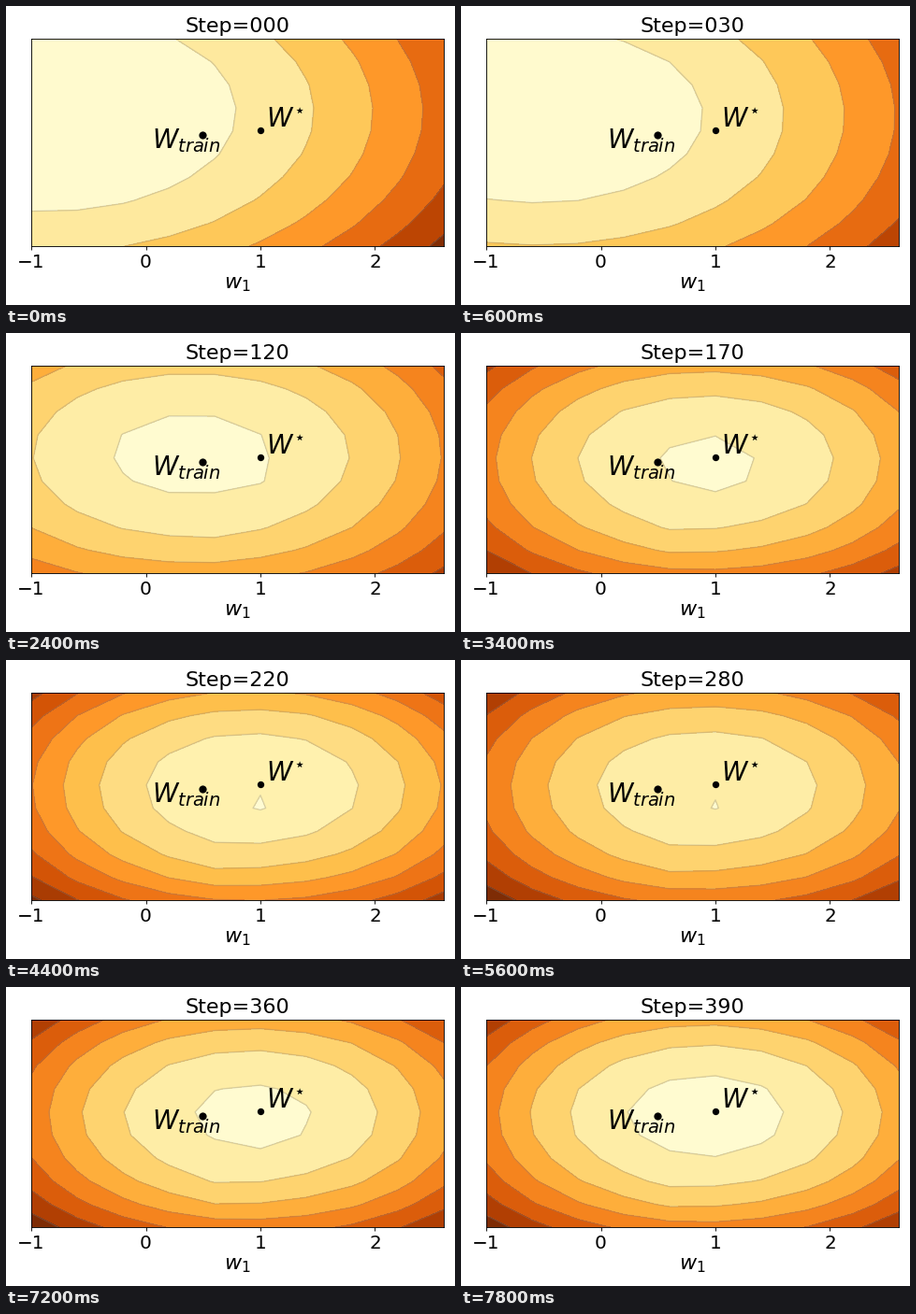
Write a matplotlib script that moves like this. It is 480 px wide and 320 px high and loops after 8000 ms.

```python
import numpy as np
import matplotlib.pyplot as plt
from matplotlib.animation import FuncAnimation

W, H, DPI = 480, 320, 80
LEFT, RIGHT, TOP, BOTTOM = 27.1, 467.9, 34.9, 257.4
FRAMES, INTERVAL, N = 40, 200, 10
ARRIVE = 17  # frame at which the bowl has reached its place

w1 = np.linspace(-1, 2.6, N)
rows = np.arange(N)
# grid cells right of w1 = 1 and below the W* row
U, V = np.meshgrid(np.arange(N) - 5, 5 - rows)


def dip(u, v, depth, spread):
    return depth * np.exp(-((U - u) ** 2 + (V - v) ** 2) / spread)


ROUGH = dip(0, 1, 0.2, 0.3) + dip(-1, 3.5, 0.25, 0.9)


def row_at(y):
    """Grid row for a height in pixels from the top of the stage."""
    return (BOTTOM - y) / (BOTTOM - TOP) * (N - 1)


def loss(frame):
    """Loss on the grid in units of one contour level, and the level count."""
    p = min(frame / ARRIVE, 1)
    late = max(0, frame - ARRIVE) / (FRAMES - 1 - ARRIVE)
    du = (U - (-4.67 + 4.48 * p)) ** 2
    dv = (V - (-0.82 + 0.95 * p)) ** 2
    steep = 0.063 + 0.081 * p ** 1.75 + 0.02 * late
    floor = np.interp(frame, [0, 7, 17, 28, 32, 39],
                      [-0.04, 0.5, 0.82, 1.05, 1.0, 0.48])
    bands = round(np.interp(frame, [0, 7, 17, 22, 27], [7, 8, 8, 9, 8]))
    z = floor + (steep + 0.005) * du + steep * dv
    z -= p * 0.0012 * du * dv + p ** 2 * ROUGH
    return np.clip(z * bands / 8, 0.001, bands - 0.001), bands


fig = plt.figure(figsize=(W / DPI, H / DPI), dpi=DPI, facecolor="white")
ax = fig.add_axes([LEFT / W, 1 - BOTTOM / H,
                   (RIGHT - LEFT) / W, (BOTTOM - TOP) / H])
ax.set_xlim(-1, 2.6)
ax.set_ylim(0, N - 1)
ax.set_xticks([-1, 0, 1, 2])
ax.set_yticks([])
ax.tick_params(labelsize=18)
title = ax.set_title("Step=000", fontsize=20)
fig.text(247.5 / W, 1 - 302 / H, "$w_1$", fontsize=20, ha="center")


def mark(x, y, size, label, label_y):
    ax.plot(x, row_at(y), "o", color="black", ms=size, mew=0, zorder=5)
    ax.text(round(x * 2) / 2 + (0.05 if x == 1 else -0.45), row_at(label_y),
            label, fontsize=25, zorder=6)


mark(0.49, 138.3, 7.4, "$W_{train}$", 152.3)
mark(1, 133.4, 6.6, r"$W^{\star}$", 129.5)

drawn = []


def update(frame):
    while drawn:
        drawn.pop().remove()
    z, bands = loss(frame)
    levels = np.arange(bands + 1)
    drawn.append(ax.contourf(w1, rows, z, levels, cmap="YlOrBr", zorder=1))
    drawn.append(ax.contour(w1, rows, z, levels, colors="gray",
                            alpha=0.3, linewidths=1.2, zorder=1.5))
    title.set_text(f"Step={frame * 10:03d}")
    return []


anim = FuncAnimation(fig, update, frames=FRAMES, interval=INTERVAL,
                     init_func=lambda: [], repeat=True, repeat_delay=0)
plt.show()
```
